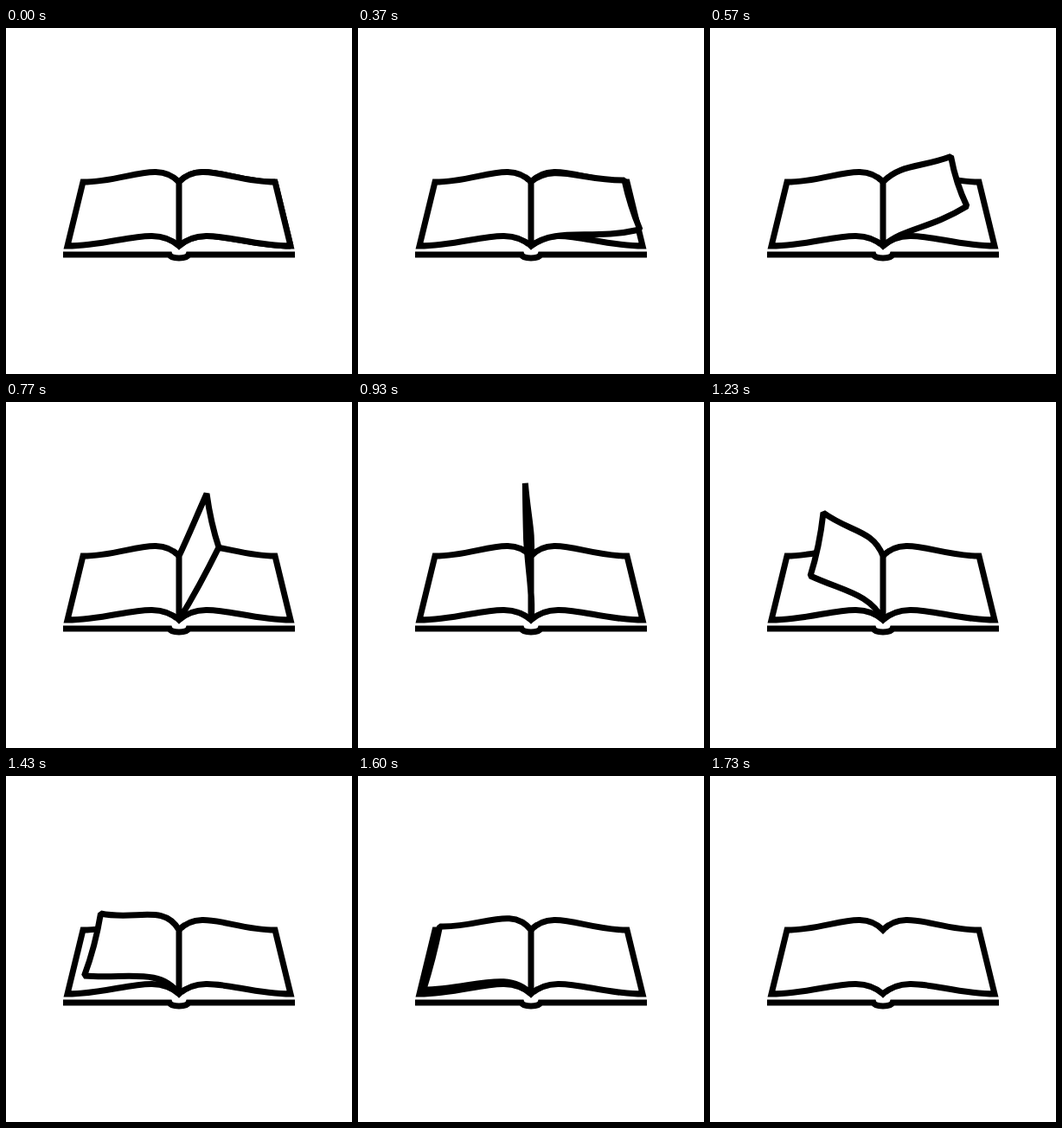
Recreate the animation shown at these times as an HTML page. Size 400 by 400 pixels, loop 1830 ms.

```html
<!DOCTYPE html>
<html lang="en">
<head>
<meta charset="utf-8">
<title>Turning page</title>
<style>
  html, body { margin: 0; width: 100%; height: 100%; overflow: hidden; background: #fff; }
  svg { display: block; width: 100vw; height: 100vh; }
  path { fill: #fff; stroke: #000; stroke-width: 7; }
  #cover { fill: none; }
  #page { stroke-linejoin: bevel; }
</style>
</head>
<body>
<svg viewBox="0 0 400 400">
  <path id="cover" d="M66 262H189C191 267.3 209 267.3 211 262H334"/>
  <path id="book"/>
  <path id="page"/>
</svg>
<script>
  const LOOP = 1830, TICK = 100 / 3;
  const SPINE = 200, TOP = 178, BOTTOM = 252;

  // Path of the free corners: tick, upper x, y, lower x, y
  const keys = [
    [5, 311, 178, 329, 252],
    [11, 308, 176, 326, 233],
    [17, 278.5, 148.5, 297, 206],
    [23, 232, 106, 246, 168],
    [32, 164, 100, 155, 168],
    [37, 131, 128, 116, 201],
    [43, 109.5, 159, 90.5, 231],
    [52, 89, 178, 71, 252]
  ];
  const first = keys[0], last = keys[keys.length - 1];

  function slope(n, i) {
    if (n === 0 || n === keys.length - 1) return 0;
    const [a, b, c] = keys.slice(n - 1, n + 2);
    const d0 = b[0] - a[0], d1 = c[0] - b[0];
    return ((b[i] - a[i]) / d0 * d1 + (c[i] - b[i]) / d1 * d0) / (d0 + d1);
  }

  // Smooth cubic through the keys
  function cornersAt(tick) {
    if (tick <= first[0]) return first;
    const n = keys.findIndex(k => k[0] >= tick) - 1;
    const a = keys[n], b = keys[n + 1];
    const d = b[0] - a[0], u = (tick - a[0]) / d, v = 1 - u;
    return a.map((y, i) =>
      y * v * v * (1 + 2 * u) + b[i] * u * u * (3 - 2 * u) +
      d * u * v * (slope(n, i) * v - slope(n + 1, i) * u));
  }

  // Paper edge: rises out of the spine, then runs straight at the corner
  function edge(y, [cx, cy], lift = 0, bend = 0, sag = 0) {
    const dx = cx - SPINE, dy = cy - y;
    return [
      [SPINE, y],
      [SPINE + 0.22 * dx + 4 * lift, y - 26 + 5 * bend],
      [cx - 0.45 * dx, cy - 0.45 * dy + sag * bend],
      [cx, cy]
    ];
  }
  const curve = points => 'C' + points.slice(1).join(' ');
  const back = points => curve([...points].reverse());

  function bookPath() {
    const [topR, topL] = [first, last].map(k => edge(TOP, k.slice(1, 3)));
    const [lowR, lowL] = [first, last].map(k => edge(BOTTOM, k.slice(3)));
    return `M${topL[3]}${back(topL)}${curve(topR)}L${lowR[3]}${back(lowR)}${curve(lowL)}Z`;
  }

  function pagePath(tick) {
    const [, ax, ay, bx, by] = cornersAt(tick);
    const turn = Math.max(0, (tick - first[0]) / (last[0] - first[0]));
    const lift = Math.sin(Math.PI * turn), bend = Math.sin(2 * Math.PI * turn);
    const top = edge(TOP, [ax, ay], lift, bend);
    const low = edge(BOTTOM, [bx, by], lift, bend, 6);
    const side = [(ax + bx) / 2 - 3.5 * bend, (ay + by) / 2 + 3 * lift];
    return `M${top[0]}${curve(top)}Q${side} ${low[3]}${back(low)}Z`;
  }

  const page = document.getElementById('page');
  document.getElementById('book').setAttribute('d', bookPath());

  // Drawn in steps of a thirtieth of a second, snapped to 10 ms
  function draw(now) {
    const t = Math.floor(now % LOOP / 10) * 10;
    const tick = Math.floor((t + 4) / TICK);
    page.setAttribute('d', tick < last[0] ? pagePath(tick) : '');
  }

  let start;
  function loop(now) {
    start ??= now;
    draw(now - start);
    requestAnimationFrame(loop);
  }
  draw(0);
  requestAnimationFrame(loop);
</script>
</body>
</html>
```
